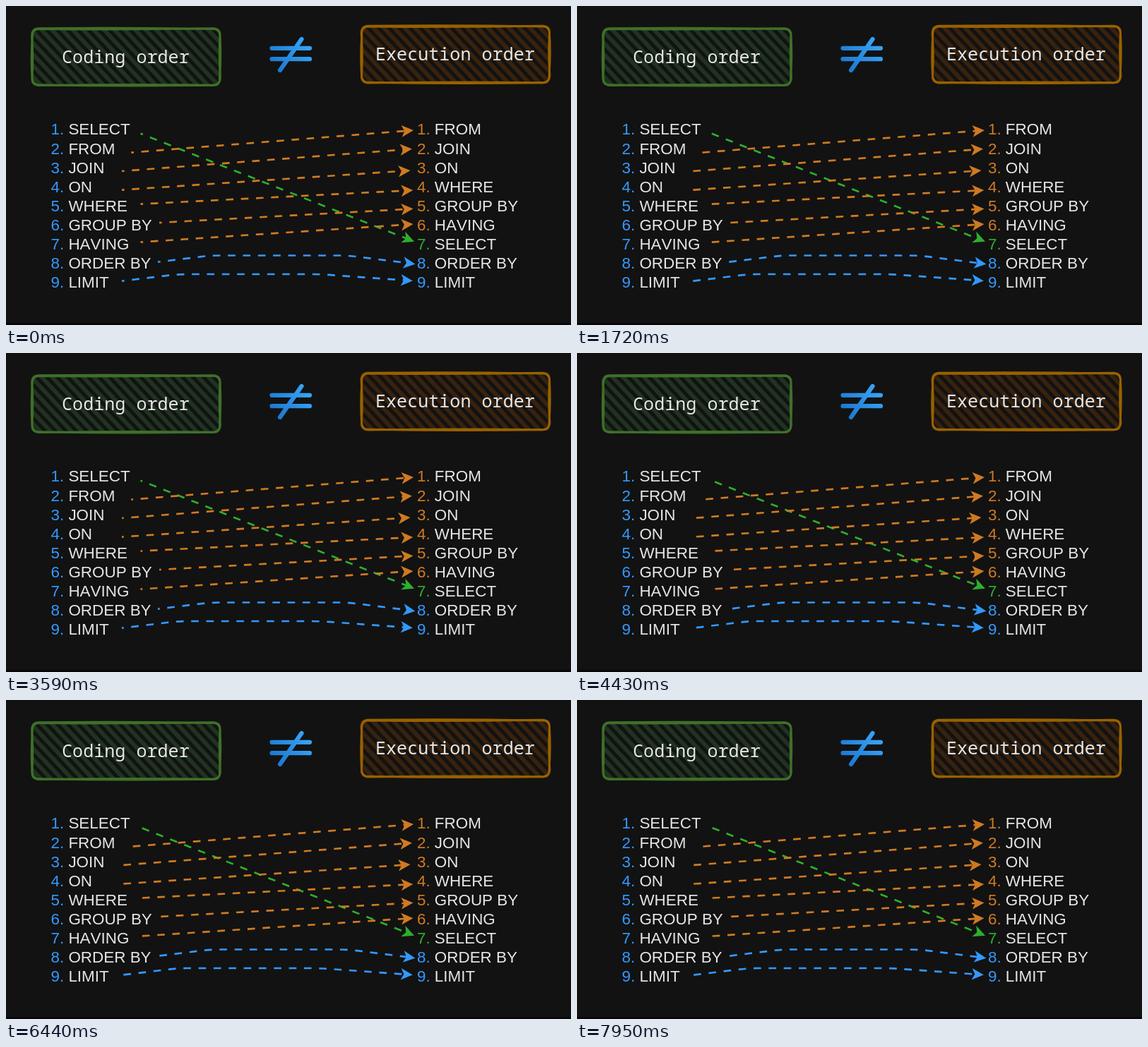
Animation, 800 px wide and 452 px high, one loop 8000 ms. Source, as an HTML page:

```html
<!DOCTYPE html>
<html lang="en">
<head>
<meta charset="utf-8">
<title>Coding order and execution order</title>
<style>
  html, body { margin: 0; width: 100%; height: 100%; overflow: hidden; background: #121212; }
  svg { display: block; width: 800px; height: 452px; }
  .list { font: 22.45px "Liberation Sans", Arial, sans-serif; font-kerning: none; }
  .title { font: 500 25.1px "Noto Sans Mono", "DejaVu Sans Mono", monospace; text-anchor: middle; }
  text { fill: #e6e6e6; }
  path { fill: none; }
</style>
</head>
<body>
<svg id="stage" viewBox="0 0 800 452">
  <defs>
    <linearGradient id="sky" gradientUnits="userSpaceOnUse" x1="376" y1="90" x2="432" y2="50">
      <stop offset="0" stop-color="#1a74ca"/>
      <stop offset="1" stop-color="#3aa8fb"/>
    </linearGradient>
  </defs>
  <rect y="449" width="800" height="3" fill="#0a070a"/>
  <g stroke="url(#sky)" stroke-width="6.2" stroke-linecap="round">
    <path d="M376.5 59.8H430M376.5 75.2H430M388 91L418.5 47"/>
  </g>
</svg>
<script>
const stage = document.getElementById('stage');
const BLUE = '#3399ff', ORANGE = '#d07a22', GREEN = '#2eae2e';
const STEP = 69.17, LOOP = 8000, CYCLE = 517, DASH = 10.67, START_PHASE = 0.17;

function add(tag, attributes, text = '', parent = stage) {
  const node = document.createElementNS('http://www.w3.org/2000/svg', tag);
  for (const [key, value] of Object.entries(attributes)) node.setAttribute(key, value);
  node.textContent = text;
  parent.append(node);
  return node;
}

// Hatched box with a doubled, slightly uneven hand-drawn outline.
function sketchBox(id, x, y, color, hatch, label) {
  const w = 266, h = 80, r = 10;
  const pattern = add('pattern', {
    id, width: 10.8, height: 10.8, patternUnits: 'userSpaceOnUse', patternTransform: 'rotate(-43)'
  }, '', stage.querySelector('defs'));
  add('rect', { width: 5.8, height: 10.8, fill: hatch }, '', pattern);
  add('rect', { x, y, width: w, height: h, rx: r, fill: `url(#${id})` });
  for (const bow of [-0.9, 0.9]) {
    add('path', {
      stroke: color, 'stroke-width': 2.9, 'stroke-linejoin': 'round',
      d: `M${x + r} ${y + bow / 2}Q${x + w / 2} ${y + bow * 2} ${x + w - r} ${y - bow / 2}
          Q${x + w + bow} ${y} ${x + w} ${y + r}
          Q${x + w + bow * 2} ${y + h / 2} ${x + w - bow / 2} ${y + h - r}
          Q${x + w} ${y + h + bow} ${x + w - r} ${y + h}
          Q${x + w / 2} ${y + h + bow * 2} ${x + r} ${y + h - bow / 2}
          Q${x + bow} ${y + h} ${x} ${y + h - r}
          Q${x - bow * 2} ${y + h / 2} ${x + bow / 2} ${y + r}
          Q${x} ${y + bow} ${x + r} ${y + bow / 2}Z`
    });
  }
  add('text', { class: 'title', x: x + w / 2 - 0.6, y: y + 48.7 }, label);
}

function list(x, words, colorOf) {
  words.forEach((word, i) => {
    const y = Math.round(182.4 + i * 27.1);
    add('text', { class: 'list', x, y, style: `fill:${colorOf(i)}` }, `${i + 1}.`);
    add('text', { class: 'list', x: x + 24.8, y }, word);
  });
}

// Points run from the tail to the arrow tip; inner points are rounded corners.
function arrow(color, ...points) {
  const [tipX, tipY] = points.at(-1), [fromX, fromY] = points.at(-2);
  const angle = Math.atan2(tipY - fromY, tipX - fromX);
  const end = [tipX - 12 * Math.cos(angle), tipY - 12 * Math.sin(angle)];
  let d = `M${points[0]}`;
  points.slice(1, -1).forEach(([x, y], i) => {
    const toward = ([px, py]) => {
      const k = 13.3 / Math.hypot(px - x, py - y);
      return [x + (px - x) * k, y + (py - y) * k];
    };
    d += `L${toward(points[i])}Q${[x, y]} ${toward(points[i + 2])}`;
  });
  const line = add('path', { d: `${d}L${end}`, stroke: color, 'stroke-width': 2.67, 'stroke-dasharray': DASH });
  add('path', {
    d: 'M-2.5 0L-15.5 6.4L-12.2 0L-15.5 -6.4Z', style: `fill:${color}`, stroke: color, 'stroke-width': 1.7,
    transform: `translate(${tipX} ${tipY}) rotate(${angle * 180 / Math.PI})`
  });
  return line;
}

sketchBox('greenHatch', 37, 32.2, '#3f7029', '#1f3320', 'Coding order');
sketchBox('amberHatch', 503.5, 28.7, '#986100', '#38220d', 'Execution order');

const clauses = ['FROM', 'JOIN', 'ON', 'WHERE', 'GROUP BY', 'HAVING'];
list(63.6, ['SELECT', ...clauses, 'ORDER BY', 'LIMIT'], () => BLUE);
list(582, [...clauses, 'SELECT', 'ORDER BY', 'LIMIT'], i => i < 6 ? ORANGE : i === 6 ? GREEN : BLUE);

const lines = [
  arrow(GREEN, [190.5, 180.7], [578.5, 334]),
  arrow(ORANGE, [177.3, 207.6], [577.5, 176]),
  arrow(ORANGE, [164, 234], [575.5, 202.5]),
  arrow(ORANGE, [164, 260.6], [573, 233]),
  arrow(ORANGE, [190.5, 280.6], [577, 261]),
  arrow(ORANGE, [217, 307], [577, 287.3]),
  arrow(ORANGE, [190.5, 334.6], [577, 309]),
  arrow(BLUE, [215, 362.7], [290, 353.5], [484, 353.5], [580, 365.7]),
  arrow(BLUE, [164, 389.7], [244, 380], [444, 380], [576.5, 389.5])
];

function draw(now) {
  const time = Math.floor((now % LOOP + 20) / STEP) * STEP;
  const front = (START_PHASE + time / CYCLE) % 1 * 2 * DASH;
  for (const line of lines) line.setAttribute('stroke-dashoffset', DASH - front);
  requestAnimationFrame(draw);
}
draw(0);
</script>
</body>
</html>
```
